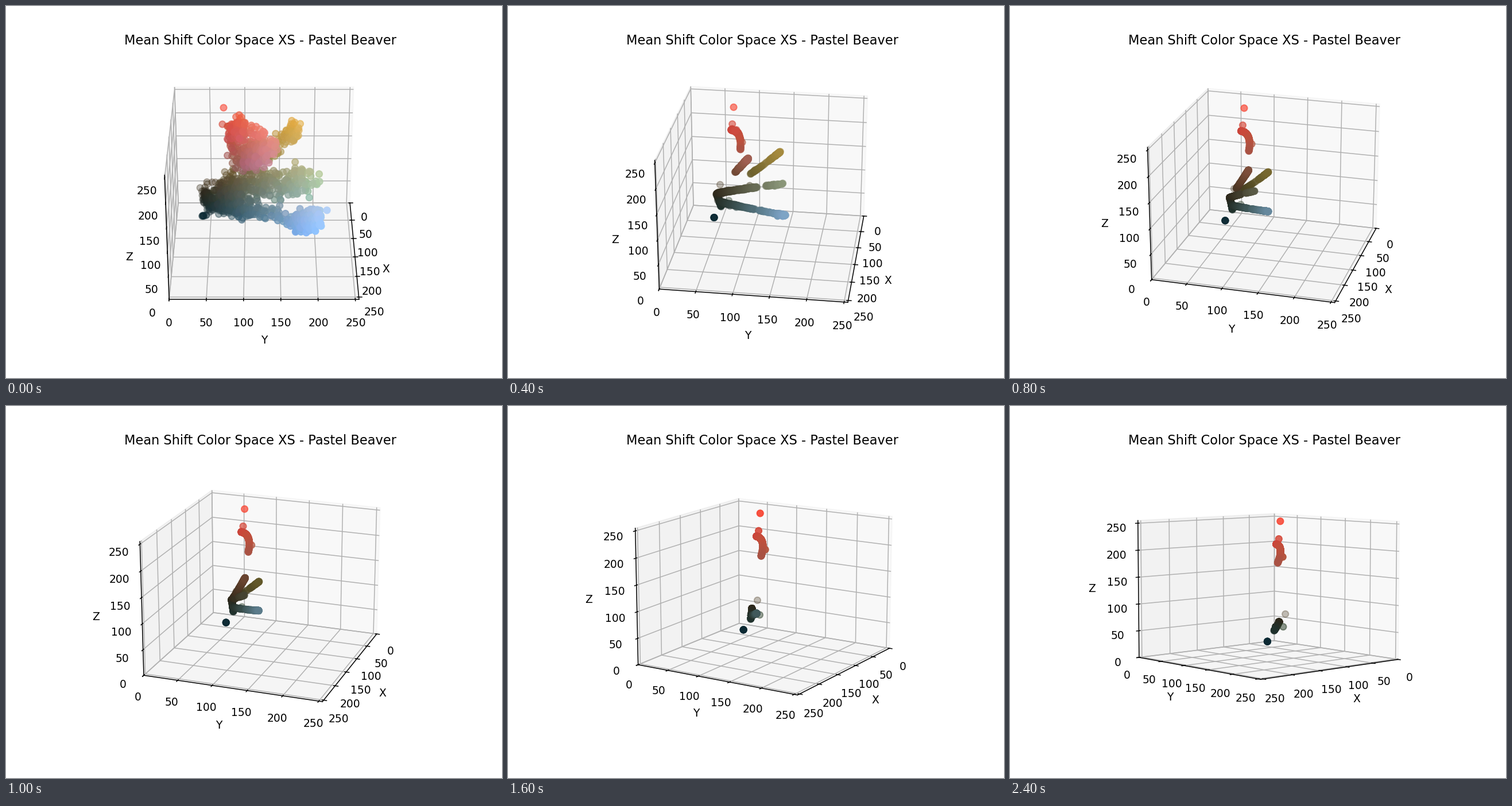
Recreate the animation shown at these times as a matplotlib script. Size 864x648 px, loop 2.5 s.

```python
import numpy as np
import matplotlib.pyplot as plt
from matplotlib.animation import FuncAnimation

FRAMES = 25
LIGHT = np.array([1, 1, 1])       # darker to brighter
WARM = np.array([1, 0.1, -1])     # cool to warm
SINK = (46, 40, 27)
TEAL = (32, 50, 46)
RED = (203, 68, 58)

rng = np.random.default_rng(7)
swarms = []


def bezier(tip, bend, end, s):
    s = np.clip(s, 0, 1)[:, None]
    return ((1 - s) ** 2 * np.array(tip) + 2 * s * (1 - s) * np.array(bend)
            + s ** 2 * np.array(end))


def add(curve, n, span=(0, 1), light=0, warm=0, lift=0, life=None):
    """Scatter n points around a colour curve; with a life they slide along it."""
    s0 = rng.uniform(*span, n)
    noise = np.clip(rng.normal(size=(2, n, 1)), -2, 2)
    offset = (lift + light * noise[0]) * LIGHT + warm * noise[1] * WARM
    offset += rng.normal(0, 0.2 * light, (n, 3))
    decay = np.where(rng.random((n, 1)) < 0.03, 0.7, 0.48)
    swarms.append((curve, s0, offset, decay, 1 / life if life else 0))


def still(rgb, n=1, spread=0):
    add((rgb, rgb, rgb), n, light=spread)


gray = (208, 236, 196), (53, 44, 28), SINK
salmon = (190, 108, 108), (134, 84, 52), SINK
yellow = (218, 172, 79), (108, 104, 43), SINK
blue = (150, 190, 240), (70, 105, 104), (38, 47, 40)
rose = (220, 110, 96), (210, 90, 76), RED
red = RED, (200, 84, 58), (169, 82, 68)
dark = SINK, (38, 46, 37), TEAL

add(gray, 30, (0, 0.1), light=6, warm=9, lift=-34, life=16)
add(gray, 340, (0.16, 0.72), light=10, warm=10, lift=6, life=16)
add(salmon, 150, (0, 0.1), light=11, warm=8, lift=16, life=16)
add(salmon, 90, (0.05, 0.35), light=8, warm=9, lift=8, life=16)
add(yellow, 36, (0, 0.06), light=5, warm=7, life=16)
add(yellow, 50, (0, 0.35), light=7, warm=6, life=16)
add(blue, 170, (0, 0.07), light=9, warm=6, life=24)
add(blue, 70, (0.05, 0.6), light=6, warm=5, life=24)
add(blue, 190, (0.52, 0.92), light=6, warm=7, life=24)
add(rose, 26, (0, 0.5), light=7, warm=5, lift=10, life=5)
add(red, 100, (0, 0.4), light=6, warm=7, lift=15)
add(red, 45, (0.4, 1), light=6, warm=7, lift=7)
add(dark, 80, light=4, warm=4)

still((10, 40, 50), n=8, spread=2)
for rgb in [(247, 71, 53), (213, 69, 54), (180, 84, 60), (61, 44, 18),
            (40, 60, 37)]:
    still(rgb)


def cloud(i):
    parts = [bezier(*curve, s0 + i * speed) + offset * decay ** i
             for curve, s0, offset, decay, speed in swarms]
    return np.clip(np.vstack(parts), 0, 255)


fig = plt.figure(figsize=(6.4, 4.8), dpi=135)
ax = fig.add_subplot(projection="3d")
ax.set_title("Mean Shift Color Space XS - Pastel Beaver")
ax.set(xlim=(0, 255), ylim=(0, 255), zlim=(0, 255),
       xlabel="X", ylabel="Y", zlabel="Z")


def draw(i):
    for old in list(ax.collections):
        old.remove()
    rgb = cloud(i)
    r, g, b = rgb.T
    ax.scatter(b, g, r, c=rgb / 255, s=36)
    ax.view_init(elev=30 - i, azim=2 * i)
    return ax.collections


anim = FuncAnimation(fig, draw, frames=FRAMES, interval=100,
                     repeat=True, repeat_delay=0, blit=False)
plt.show()
```
